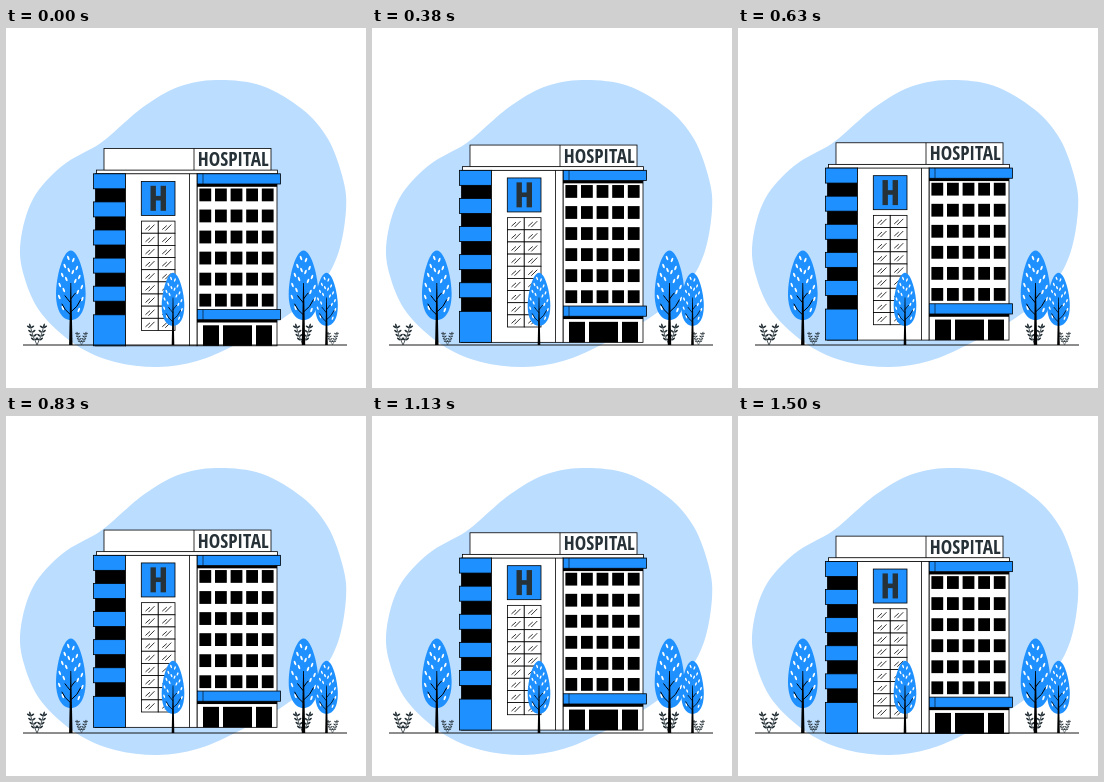
Animation, 360 px wide and 360 px high, one loop 1540 ms. Source, as an HTML page with a canvas:

```html
<!DOCTYPE html>
<html lang="en">
<head>
<meta charset="utf-8">
<title>Hospital</title>
<style>
html, body { margin: 0; width: 100%; height: 100%; overflow: hidden; background: #fff; }
canvas { display: block; width: 360px; height: 360px; }
</style>
</head>
<body>
<canvas id="stage" width="360" height="360"></canvas>
<script>
const ctx = document.getElementById('stage').getContext('2d');
const PERIOD = 1540, LIFT = 7, GROUND = 317;
const BLUE = '#1e90ff', PALE = '#bbddff', DARK = '#263238', INK = '#000', WHITE = '#fff';

const BLOB = [[210, 52], [255, 57.5], [296, 81], [322, 111], [337, 151], [340, 182], [332, 226],
  [312, 261], [276, 291], [229, 317], [191, 333], [152, 339], [109, 334], [70, 317], [35, 285],
  [18, 248], [14.5, 214], [27, 171], [56, 138], [94, 115.5], [118, 95], [140, 77], [172, 59]];

function box(x, y, w, h, fill, outlined = true) {
  ctx.fillStyle = fill;
  ctx.fillRect(x, y, w, h);
  if (!outlined) return;
  ctx.strokeStyle = INK;
  ctx.lineWidth = 0.8;
  ctx.strokeRect(x, y, w, h);
}

function line(x1, y1, x2, y2, width = 0.8) {
  ctx.strokeStyle = INK;
  ctx.lineWidth = width;
  ctx.beginPath();
  ctx.moveTo(x1, y1);
  ctx.lineTo(x2, y2);
  ctx.stroke();
}

function leaf(x, y, length, width, angle, color) {
  ctx.fillStyle = color;
  ctx.beginPath();
  ctx.ellipse(x, y, length, width, angle, 0, Math.PI * 2);
  ctx.fill();
}

// Closed Catmull-Rom curve through the points
function blob(points) {
  const at = i => points[(i + points.length) % points.length];
  ctx.beginPath();
  ctx.moveTo(...points[0]);
  points.forEach((p, i) => {
    const a = at(i - 1), q = at(i + 1), b = at(i + 2);
    ctx.bezierCurveTo(p[0] + (q[0] - a[0]) / 6, p[1] + (q[1] - a[1]) / 6,
      q[0] - (b[0] - p[0]) / 6, q[1] - (b[1] - p[1]) / 6, ...q);
  });
  ctx.fillStyle = PALE;
  ctx.fill();
}

function sign() {
  box(98, 120.2, 167, 22, WHITE);
  line(188, 120.2, 188, 142);
  let size = 20;
  const setFont = () => {
    ctx.font = `condensed 700 ${size}px "Open Sans Condensed", "Roboto Condensed", "Open Sans", Roboto, sans-serif`;
  };
  setFont();
  while (ctx.measureText('HOSPITAL').width > 71 && size > 10) {
    size -= 0.25;
    setFont();
  }
  ctx.fillStyle = DARK;
  ctx.textAlign = 'center';
  ctx.textBaseline = 'alphabetic';
  ctx.fillText('HOSPITAL', 227.3, 131 + size * 0.357);
}

function leftWing() {
  box(89.5, 145.5, 30, 172, INK);
  for (let i = 0; i < 5; i++) box(87.5, 145.5 + i * 28.1, 32, 15, BLUE);
  box(87.5, 286.5, 32, 31, BLUE);
}

function tower() {
  box(119.5, 145.5, 71.5, 172, WHITE);
  line(183.5, 145.5, 183.5, 317.5);
  box(135.3, 153.1, 33.7, 34, BLUE);
  box(144.5, 157.5, 5.4, 25, DARK, false);
  box(154.6, 157.5, 5.4, 25, DARK, false);
  box(149, 167.6, 6, 4.6, DARK, false);

  const rowHeight = 12.15;
  for (let row = 0; row < 9; row++) {
    for (let col = 0; col < 2; col++) {
      const x = 135.5 + col * 16.75, y = 192.8 + row * rowHeight;
      box(x, y, 16.75, rowHeight, WHITE);
      line(x + 4, y + 8.5, x + 8.5, y + 4.5);
      line(x + 7, y + 9.5, x + 13, y + 3.5);
    }
  }
}

function band(y) {
  box(191, y + 10, 80, 3, INK, false);
  box(191, y, 83.5, 10.2, BLUE);
  line(197, y, 197, y + 10.2, 0.6);
}

function rightWing() {
  box(191, 145.5, 80, 172, WHITE);
  for (let row = 0; row < 6; row++) {
    for (let col = 0; col < 5; col++) {
      box(193.4 + col * 15.6, 160.2 + row * 21.05, 11.8, 12.8, INK, false);
    }
  }
  band(145.5);
  band(281.2);
  for (const [x, w] of [[197, 16], [217, 29], [250, 16]]) box(x, 297, w, 20.5, INK, false);
}

function building(offset) {
  ctx.save();
  ctx.translate(0, offset);
  sign();
  box(90.5, 141.8, 181, 4, WHITE);
  leftWing();
  rightWing();
  tower();
  ctx.restore();
}

function tree(x, scale) {
  ctx.save();
  ctx.translate(x, GROUND);
  ctx.scale(scale, scale);
  ctx.fillStyle = BLUE;
  ctx.beginPath();
  ctx.moveTo(0, -94.5);
  ctx.bezierCurveTo(8, -94.5, 14.8, -68, 14.8, -51);
  ctx.bezierCurveTo(14.8, -35, 9, -25, 0, -25);
  ctx.bezierCurveTo(-9, -25, -14.8, -35, -14.8, -51);
  ctx.bezierCurveTo(-14.8, -68, -8, -94.5, 0, -94.5);
  ctx.fill();

  const leaves = [[2.5, -86], [6, -78], [2, -74], [8.5, -69], [4.5, -65], [11, -59], [7, -54], [11.5, -47], [8, -36]];
  for (const side of [-1, 1]) {
    for (const [lx, ly] of leaves) {
      leaf(side * lx, ly + side, 2.4, 1, side * -1.2, WHITE);
    }
  }

  ctx.fillStyle = INK;
  ctx.beginPath();
  ctx.moveTo(-1.7, 0);
  ctx.lineTo(-0.4, -62);
  ctx.lineTo(0.4, -62);
  ctx.lineTo(1.7, 0);
  ctx.fill();

  ctx.strokeStyle = INK;
  ctx.lineWidth = 1;
  ctx.beginPath();
  for (const [side, from, reach] of [[-1, -30, 9], [1, -33, 10], [-1, -42, 6], [1, -46, 5]]) {
    ctx.moveTo(0, from);
    ctx.quadraticCurveTo(side * reach * 0.7, from - 5, side * reach, from - reach * 1.25);
  }
  ctx.stroke();
  ctx.restore();
}

function stem(lean, height) {
  ctx.strokeStyle = DARK;
  ctx.lineWidth = 0.8;
  ctx.beginPath();
  ctx.moveTo(0, 0);
  ctx.quadraticCurveTo(lean * 0.6, -height * 0.4, lean, -height);
  ctx.stroke();
  for (let i = 1; i <= 4; i++) {
    const u = 0.1 + i * 0.2;
    const x = lean * (1.2 * u * (1 - u) + u * u);
    const y = -height * (0.8 * u * (1 - u) + u * u);
    leaf(x - 2, y - 1, 2, 0.9, 0.6, DARK);
    leaf(x + 2, y - 1, 2, 0.9, -0.6, DARK);
  }
  leaf(lean, -height, 2, 0.8, -Math.PI / 2 + lean * 0.04, DARK);
}

function plant(x, scale) {
  ctx.save();
  ctx.translate(x, GROUND);
  ctx.scale(scale, scale);
  stem(-7, 19.5);
  stem(7, 19.5);
  ctx.restore();
}

function draw(time) {
  const phase = (time % PERIOD) / PERIOD;
  const rise = LIFT * (1 - Math.abs(2 * phase - 1));
  ctx.fillStyle = WHITE;
  ctx.fillRect(0, 0, 360, 360);
  blob(BLOB);
  building(0.3 - rise);
  line(17, GROUND, 341, GROUND, 0.9);
  plant(31, 1);
  plant(75.5, 0.62);
  plant(297, 1);
  plant(326.5, 0.62);
  tree(64.8, 1);
  tree(167, 0.765);
  tree(297.5, 1);
  tree(320.5, 0.765);
}

let start;
function frame(now) {
  start ??= now;
  draw(now - start);
  requestAnimationFrame(frame);
}
requestAnimationFrame(frame);
</script>
</body>
</html>
```
